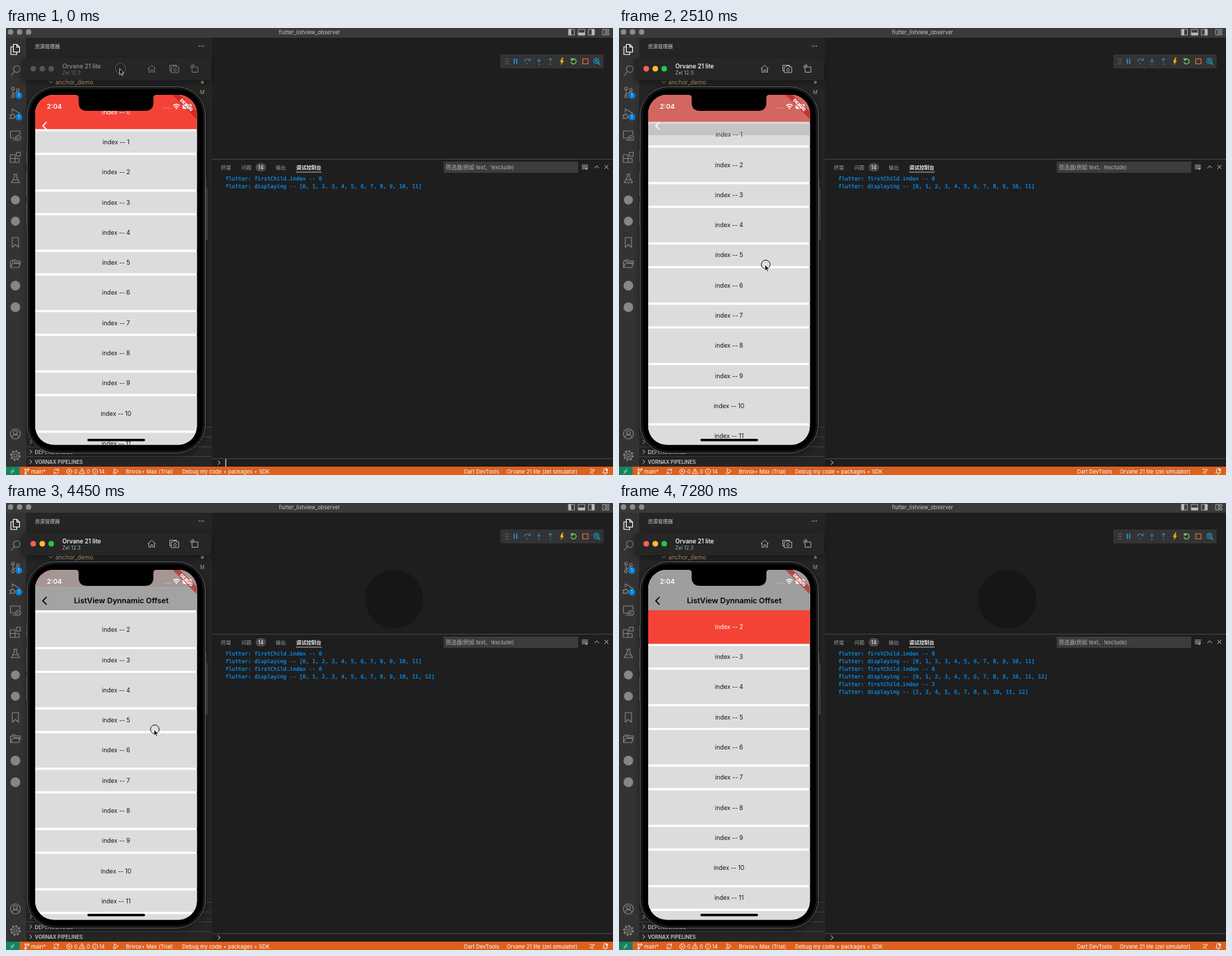
These frames come from a looping animation (873 px wide and 642 px high, 7580 ms). An HTML page:

```html
<!DOCTYPE html>
<html lang="zh">
<head>
<meta charset="utf-8">
<title>ListView observer</title>
<style>
html, body { margin: 0; width: 100%; height: 100%; overflow: hidden; background: #1e1e1e; }
svg { display: block; width: 873px; height: 642px; }
text { font: 7.2px Inter, "Noto Sans CJK SC", "Noto Sans CJK JP", sans-serif; fill: #c8c8c8; white-space: pre; }
.mid { text-anchor: middle; }
.bold { font-weight: 600; }
.line { fill: none; stroke: #868686; stroke-width: 1; stroke-linecap: round; stroke-linejoin: round; }
.status text { font-size: 7.62px; fill: #fff; }
.status .line { stroke: #fff; stroke-width: .8; }
.console text { font: 7.69px "DejaVu Sans Mono", monospace; fill: #0892f2; stroke: #0892f2; stroke-width: .22; }
.tabs text { fill: #a0a0a0; }
.tabs .bold { fill: #eee; }
.badge text { font-size: 6px; fill: #fff; }
.window .name { font-size: 8.5px; font-weight: 600; }
.shadow { filter: drop-shadow(0 3px 5px #0006); }
#list text { font-size: 8.7px; }
</style>
</head>
<body>
<svg viewBox="0 0 873 642">
  <defs>
    <clipPath id="screen"><rect x="42" y="96" width="232.5" height="502.6" rx="27"/></clipPath>
  </defs>

  <!-- editor window -->
  <rect width="873" height="642" fill="#1e1e1e"/>
  <rect y="14" width="29" height="616" fill="#333"/>
  <rect x="29" y="14" width="267" height="616" fill="#252526"/>
  <rect width="873" height="14" fill="#3a3a3b"/>
  <g fill="#8c8c8c"><circle cx="6.5" cy="5.7" r="3.9"/><circle cx="19.5" cy="5.7" r="3.9"/><circle cx="32.5" cy="5.7" r="3.9"/></g>
  <text class="mid" x="436.5" y="8.6" style="font-size:7.65px">flutter_listview_observer</text>
  <g class="line" style="stroke:#bbb;stroke-width:.8">
    <path d="M809.5 2h8v8h-8zM823.5 2h9v8h-9zM838 2h8v8h-8zM858.5 2h3.5v8h-3.5zM864 2h3v3h-3zM864 7h3v3h-3z"/>
    <path fill="#bbb" d="M809.5 2h3v8h-3zM823.5 7h9v3h-9zM843 2h3v8h-3z"/>
  </g>

  <!-- activity bar -->
  <g class="line" style="stroke-width:1.1">
    <path style="stroke:#fff" d="M10.5 23.5h5l4 4v7h-9zM10.5 27h-3.500v11h8.500v-3.500M15.500 23.500v4h4"/>
    <circle cx="15.5" cy="59" r="4.8"/><path d="M12 62.500L7.500 68"/>
    <circle cx="10" cy="87" r="2"/><circle cx="17" cy="89" r="2"/><circle cx="10" cy="98" r="2"/>
    <path d="M10 89v7M17 91c0 4-7 1-7 5"/>
    <path d="M9 121v-5l11 7-7 5"/><circle cx="9.5" cy="127" r="3"/><path d="M5 125l2 1M5 130l2-1M8 124h3"/>
    <path d="M14 158h-7.500v-10h13.500v5M10 161h4"/><circle cx="17.5" cy="158" r="3.5"/><path d="M16.500 157l1.300 1-1.300 1.200"/>
    <path d="M7 182h6v11h-7v-11zM6 187.500h13v5.500h-6M15 178.500h5.500v5.500h-5.500z"/>
    <path d="M11 210h5M12 210v4l-4.500 8h12l-4.500-8v-4M10 218h7"/>
    <path d="M9 301h9v14l-4.500-4-4.500 4z"/>
    <path d="M6.500 344v-9h5l1.500 2h5.500v2M6.500 344h12l2-6h-11zM9 335v-2h4l1.500 1.500h6v4"/>
    <circle cx="13.5" cy="583" r="7.2"/><circle cx="13.5" cy="581" r="2.7"/><path d="M8.500 588c1-5 9-5 10 0"/>
    <circle cx="13.5" cy="614" r="2.3"/><circle cx="13.5" cy="614" r="5.2"/>
    <circle cx="13.5" cy="614" r="6.7" style="stroke-width:2;stroke-linecap:butt" stroke-dasharray="2.63"/>
  </g>
  <g fill="#868686">
    <circle cx="13.5" cy="247" r="6.5"/><circle cx="13.5" cy="277.5" r="6.5"/>
    <circle cx="13.5" cy="370" r="7"/><circle cx="13.5" cy="401" r="7"/>
  </g>
  <g class="badge" fill="#087bd0">
    <circle cx="18.5" cy="97" r="5"/><text class="mid" x="18.5" y="99.3">1</text>
    <circle cx="18.5" cy="128" r="5"/><text class="mid" x="18.5" y="130.3">1</text>
  </g>

  <!-- side bar -->
  <text x="41.5" y="29">资源管理器</text>
  <g fill="#c8c8c8"><circle cx="278" cy="26" r=".8"/><circle cx="281" cy="26" r=".8"/><circle cx="284" cy="26" r=".8"/></g>
  <rect x="287" y="230" width="3" height="74" fill="#444"/>
  <path stroke="#414141" d="M29 573.500h267M29 587.500h267M29 601.500h267M29 615.500h267"/>
  <path class="line" style="stroke:#ccc" d="M34.500 592l2.500 2.500-2.500 2.500M34.500 606l2.500 2.500-2.500 2.500M34.500 620.500l2.500 2.500-2.500 2.500"/>
  <text class="bold" x="41.5" y="611.5">DEPENDENCIES</text>
  <text class="bold" x="41.5" y="625.7">VORNAX PIPELINES</text>

  <!-- debug toolbar -->
  <circle id="mark" cx="558" cy="138" r="42" fill="#161616"/>
  <rect x="711" y="38" width="148.5" height="20" fill="#333"/>
  <g fill="none" stroke-width="1.1" stroke-linecap="round" stroke-linejoin="round">
    <path stroke="#888" stroke-width="1.5" d="M719 44.500v0M719 48v0M719 51.500v0M722 44.500v0M722 48v0M722 51.500v0"/>
    <path stroke="#2b95df" stroke-width="1.5" d="M731 44.500v6.500M734.500 44.500v6.500"/>
    <path stroke="#2b7fb5" d="M745.500 48c1-4 6-4.500 8-1.500M754 43.500v3.300h-3.300M766.500 43.500v5M764.500 46.500l2 2 2-2M783 48.500v-5M781 45.500l2-2 2 2"/>
    <path stroke="#2b7fb5" stroke-width="2" d="M749.500 51.300v0M766.500 52v0M783 52v0"/>
    <path stroke="#f5b916" fill="#f5b916" stroke-width=".5" d="M800 43l-3 5.500h2.200l-.9 4 3.800-5.500h-2.300l1.400-4z"/>
    <path stroke="#74c96c" stroke-width="1.3" d="M813.500 45.500a3.700 3.700 0 1 1-.8 3.500M813 43.500v2.500h2.500"/>
    <path stroke="#ef7048" d="M829.500 44.200h7.500v7.300h-7.500z"/>
    <g stroke="#17a0d8"><path stroke-width="1.4" d="M851 49.500l3 3"/><circle cx="849" cy="47.3" r="3.7"/><circle cx="849" cy="47.3" r="1.2"/></g>
  </g>

  <!-- panel -->
  <path stroke="#454545" d="M296 188.500h577M296 618.500h577"/>
  <rect x="359" y="194" width="15" height="12" rx="6" fill="#4d4d4d"/>
  <text class="mid" x="366.5" y="202.6" style="fill:#fff">14</text>
  <g class="tabs">
    <text x="309" y="202.7">终端</text><text x="338.5" y="202.7">问题</text><text x="388" y="202.7">输出</text>
    <text class="bold" x="417.5" y="202.7">调试控制台</text>
  </g>
  <path stroke="#e0e0e0" stroke-width=".8" d="M417 207h37"/>
  <rect x="629.5" y="192" width="193.5" height="16" fill="#3c3c3c"/>
  <text x="632.5" y="203" style="font-size:7.7px;fill:#b8b8b8">筛选器(例如 text、!exclude)</text>
  <path class="line" style="stroke:#c5c5c5" d="M828.500 197h8M828.500 199.500h8M828.500 202h4M833.500 201.500h3l-1.500 2zM846.500 201l3-3 3 3M861 197l5 5M866 197l-5 5"/>
  <g class="console" id="logs"></g>
  <path class="line" style="stroke:#ccc" d="M305 621.500l3 2.700-3 2.700"/>
  <rect id="caret" x="315.5" y="619" width="1.2" height="11" fill="#e0e0e0"/>

  <!-- status bar -->
  <g class="status">
    <rect y="630" width="873" height="12" fill="#db611f"/>
    <rect y="630" width="19.5" height="12" fill="#16825d"/>
    <g class="line">
      <path d="M7 636l2.300 1.700-2.300 2M11.500 633.500l-2.300 2 2.300 1.700M28 635v4.500M32 635c0 3-4 1.500-4 4"/>
      <circle cx="28" cy="634" r="1.2"/><circle cx="32" cy="634" r="1.2"/><circle cx="28" cy="640" r="1.2"/>
      <path d="M69 636a3.200 3.200 0 0 1 6-1M75.500 637.500a3.200 3.200 0 0 1-6 1M75.500 633v2.300h-2.300M69 640.500v-2.300h2.300"/>
      <circle cx="91" cy="637" r="3.7"/><path d="M89.700 635.700l2.600 2.600M92.300 635.700l-2.600 2.600M109.500 633l4 7h-8zM109.500 635.500v2M109.500 639v0"/>
      <circle cx="128" cy="637" r="3.7"/><path d="M128 636.700v2M128 635v0M155.500 636v-3l6 3.500-3.500 2.500"/><circle cx="156" cy="638.8" r="1.7"/>
      <path d="M839.500 634h6.500l-1.500 3h-3l-2 2M841 639.500c2-1 3-1 4 1M858.500 639h7l-1-1.500v-2.500a2.500 2.500 0 0 0-5 0v2.500zM861 640.500h2"/>
    </g>
    <circle cx="864" cy="634.5" r="1.7" fill="#fff"/>
    <text x="36" y="639.7">main*</text><text x="98" y="639.7">0</text><text x="116" y="639.7">0</text><text x="134" y="639.7">14</text>
    <text x="172.5" y="639.7">Brivox+ Max (Trial)</text>
    <text x="253.3" y="639.7">Debug my code + packages + SDK</text>
    <text x="658.7" y="639.7">Dart DevTools</text>
    <text x="720" y="639.7">Orvane 21 lite (zel simulator)</text>
  </g>

  <!-- simulator window bar -->
  <g class="window">
    <rect class="shadow" x="22" y="42.5" width="273" height="32.5" rx="6" fill="#262627"/>
    <g id="lights"><circle cx="39.2" cy="58.5" r="4"/><circle cx="52.2" cy="58.5" r="4"/><circle cx="65" cy="58.5" r="4"/></g>
    <text class="name" id="device" x="81" y="57.5">Orvane 21 lite</text>
    <text id="system" x="81" y="66.5">Zel 12.3</text>
    <path id="tools" class="line" d="M204 58.500l5.500-5 5.500 5M205.500 57.500v6h3v-3.500h2.500v3.500h2.500v-6M237.500 61.500h-2v-8h10v1.500M238 56h2l1-1.500h3l1 1.500h3.500v8h-10.500zM243 58a2 2 0 1 0 .1 0M268 56h8v7.500h-8zM266 57v-3h4M268.500 52l2 2-2 2"/>
  </g>
  <path class="line" d="M62 76.500l2.500 2.500 2.500-2.500"/>
  <text x="71" y="81" style="font-size:8.5px;fill:#a08a64">anchor_demo</text>
  <circle cx="282.5" cy="78" r="2.2" fill="#75664d"/>
  <text x="279" y="95" style="fill:#b79c70">M</text>

  <!-- phone -->
  <rect class="shadow" x="30.5" y="84.5" width="256" height="526" rx="41" fill="#080808" stroke="#606060"/>
  <rect x="33" y="87" width="251" height="521" rx="38.5" stroke="#333" stroke-width=".8"/>
  <path stroke="#444" stroke-width="1.3" d="M29.600 176v17M29.600 208v33M29.600 250v33M287.400 215v55"/>
  <g clip-path="url(#screen)">
    <rect x="42" y="95" width="233" height="504" fill="#fff"/>
    <g id="list"></g>
    <rect id="bar" x="42" y="95" width="233" height="59" fill="#9e9e9e"/>
    <path id="back" fill="none" stroke-width="1.7" d="M58.300 135l-5.300 5.500 5.300 5.500"/>
    <text class="mid bold" id="heading" x="165.8" y="144.2" style="font-size:10.95px;fill:#000">ListView Dynnamic Offset</text>
    <text class="bold" x="58.7" y="116.3" style="font-size:9.5px;fill:#fff">2:04</text>
    <path stroke="#fff" stroke-opacity=".35" stroke-width="1.5" stroke-dasharray="1.6 1.4" d="M227 115h10.500"/>
    <path fill="none" stroke="#fff" stroke-width="1.5" d="M240.500 111.500q4.500-4 9 0M242.300 113.700q2.700-2.300 5.400 0"/><circle cx="245" cy="115.5" r="1.1" fill="#fff"/>
    <rect x="254" y="109.3" width="13" height="7" rx="2" fill="#fff"/>
    <g transform="translate(274.3 95.8) rotate(45)">
      <rect x="-30" y="17.3" width="60" height="7.5" fill="#b71c1c" fill-opacity=".65"/>
      <text class="mid" y="23.3" style="font-size:6.6px;font-weight:900;fill:#fff">DEBUG</text>
    </g>
    <path d="M100 95h116v1q-4 0-4 4v7q0 12-12 12h-83.500q-12 0-12-12v-7q0-4-4.500-4z"/>
    <rect x="117" y="590" width="83" height="3.4" rx="1.7"/>
  </g>

  <g id="cursor">
    <g id="press" fill="none">
      <circle cx="1" cy="-.5" r="7" stroke="#fff" stroke-opacity=".55" stroke-width=".7"/>
      <circle cx="1" cy="-.5" r="6.3" stroke="#111"/>
    </g>
    <path stroke="#fff" stroke-width=".7" d="M0 0v8.600l2-1.800 1.400 3 1.400-.7-1.400-2.900h2.800z"/>
  </g>
</svg>
<script>
const $ = id => document.getElementById(id);
const LOOP = 7580, PITCH = 86.6, TOP = 95.75, TALL = 49.5, SHORT = 30.9, GAP = 3.1;

// The picture is refreshed only at these times: [first, last, count]
const marks = [[0, 150, 2], [570, 1460, 7], [1760, 2800, 8], [2950, 3850, 7], [4000, 5040, 8],
  [5190, 5640, 2], [5940, 5940, 1], [6240, 7280, 8]]
  .flatMap(([a, b, n]) => Array.from({ length: n }, (_, i) => a + i * (b - a) / (n - 1 || 1)));

const scrollKeys = [[1760, 0], [2510, 10.7], [2800, 13.3], [3700, 20.2], [4450, 25], [5040, 28.7], [5190, 29.5]];
const moveKeys = [[420, 163.5, 58.5], [800, 172, 130], [1200, 200, 310], [1460, 209, 354], [1760, 209, 350.5],
  [2510, 210, 340], [3700, 212, 330.5], [4450, 213, 325.5], [5190, 213.7, 321.5],
  [6090, 213.7, 321.5], [6600, 420, 430], [7130, 855, 625], [7280, 900, 680]];

function track(keys, t, col = 1) {
  const i = keys.findIndex(k => k[0] > t);
  if (i < 0) return keys.at(-1)[col];
  if (!i) return keys[0][col];
  const a = keys[i - 1], b = keys[i];
  return a[col] + (b[col] - a[col]) * (t - a[0]) / (b[0] - a[0]);
}

const rows = Array.from({ length: 14 }, (_, i) => {
  const odd = i % 2, h = odd ? SHORT : TALL;
  return { y: TOP + (i >> 1) * PITCH + odd * (TALL + GAP), h };
});
$('list').innerHTML = rows.map(({ y, h }, i) =>
  `<rect x="42" y="${y}" width="233" height="${h}"/><text class="mid" x="158.3" y="${y + h / 2 + 3.1}">index -- ${i}</text>`).join('');
const boxes = document.querySelectorAll('#list rect'), labels = document.querySelectorAll('#list text');

const span = (a, b) => Array.from({ length: b - a + 1 }, (_, i) => a + i).join(', ');
$('logs').innerHTML = [[0, 11], [0, 12], [2, 12]].map(([a, b], i) =>
  `<g><text x="315.5" y="${218.7 + 22 * i}">flutter: firstChild.index -- ${a}</text>` +
  `<text x="315.5" y="${229.7 + 22 * i}">flutter: displaying -- [${span(a, b)}]</text></g>`).join('');
const logs = $('logs').children;

const show = (el, on) => el.style.visibility = on ? 'visible' : 'hidden';

function draw(time) {
  const t = marks.findLast(m => m <= time + 0.01);
  const scroll = track(scrollKeys, t), alpha = Math.min(1, scroll / 27.2);
  const first = scroll > 28.4 ? 2 : 0, twelve = scroll > 16.8;

  $('list').setAttribute('transform', `translate(0 ${-scroll})`);
  boxes.forEach((b, i) => b.style.fill = i === first ? '#f44336' : '#dcdcdc');
  labels.forEach((l, i) => l.style.fill = i === first ? '#fff' : '#151515');
  $('bar').style.opacity = alpha;
  $('back').style.stroke = alpha > 0.5 ? '#000' : '#fff';
  show($('heading'), alpha > 0.5);
  show(logs[1], twelve);
  show(logs[2], first === 2);
  show($('mark'), twelve);
  show($('caret'), (t + 360) % 1000 < 500);

  const active = t >= 570;
  [...$('lights').children].forEach((c, i) => c.style.fill = active ? ['#ff5f57', '#febc2e', '#28c840'][i] : '#555');
  $('device').style.fill = active ? '#eee' : '#858585';
  $('system').style.fill = active ? '#b0b0b0' : '#6c6c6c';
  $('tools').style.stroke = active ? '#aaa' : '#777';

  $('cursor').setAttribute('transform', `translate(${track(moveKeys, t)} ${track(moveKeys, t, 2)})`);
  show($('press'), t < 150 || t >= 1760 && t < 5940);
}

let start;
function tick(now) {
  start ??= now;
  draw((now - start) % LOOP);
  requestAnimationFrame(tick);
}
draw(0);
requestAnimationFrame(tick);
</script>
</body>
</html>
```
